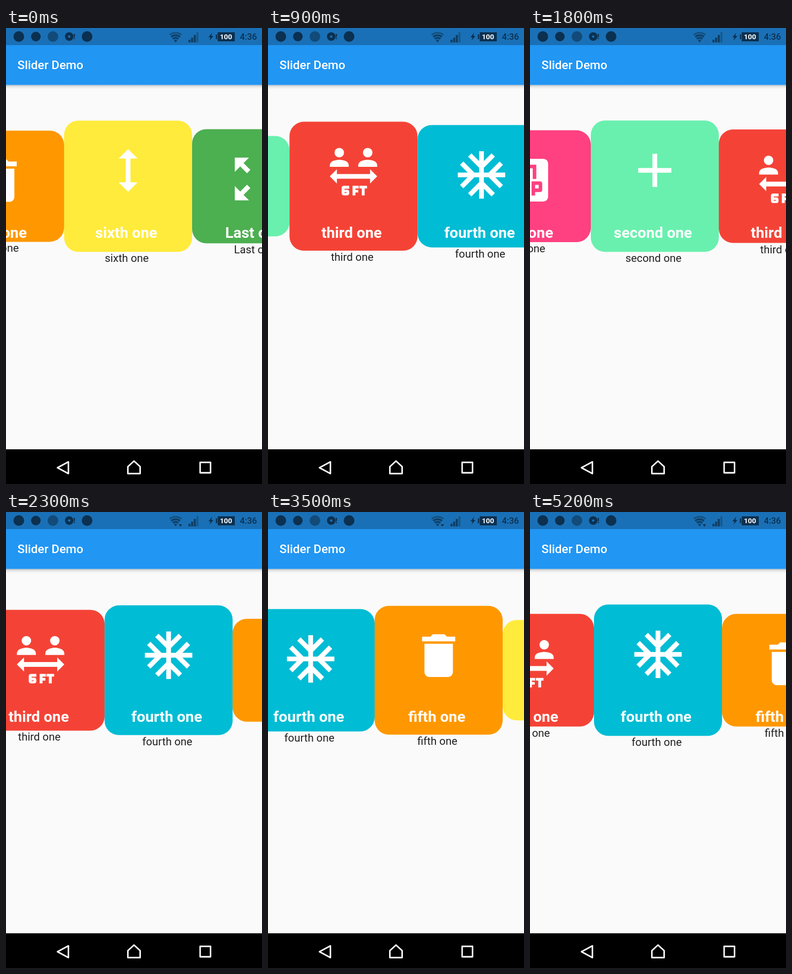
Animation of 480 by 854 pixels, one loop 5.3 s. Source, as an HTML page:

```html
<!DOCTYPE html>
<html lang="en">
<head>
<meta charset="utf-8">
<title>Slider Demo</title>
<style>
  html, body { margin: 0; width: 100%; height: 100%; overflow: hidden; background: #fafafa; }
  svg { display: block; width: 100%; height: 100%; font-family: Roboto, sans-serif; }
  .label { font-size: 28.33px; font-weight: 700; fill: #fff; text-anchor: middle; }
  .caption { font-size: 20.4px; fill: #212121; text-anchor: middle; }
  .title { font-size: 22.67px; font-weight: 500; fill: #fff; }
  .status { fill: #0b3050; }
  .nav { fill: none; stroke: #fff; stroke-width: 2.8; stroke-linejoin: round; }
</style>
</head>
<body>
<svg viewBox="0 0 480 854">
  <defs>
    <linearGradient id="shade" x2="0" y2="1">
      <stop offset="0" stop-color="#000" stop-opacity=".24"/>
      <stop offset=".4" stop-color="#000" stop-opacity=".08"/>
      <stop offset="1" stop-color="#000" stop-opacity="0"/>
    </linearGradient>
    <clipPath id="fan"><path d="M318 27L303 8V4H333V8Z"/></clipPath>
  </defs>
  <rect width="480" height="854" fill="#fafafa"/>
  <g id="cards"></g>

  <rect y="106.67" width="480" height="8" fill="url(#shade)"/>
  <rect width="480" height="106.67" fill="#2196f3"/>
  <rect width="480" height="32" fill="#1a70b6"/>
  <text class="title" x="21.5" y="77">Slider Demo</text>

  <g class="status">
    <circle cx="24" cy="16" r="10"/>
    <circle cx="56" cy="16" r="9"/>
    <circle cx="88" cy="16" r="10" fill="#124b79"/>
    <circle cx="118.500" cy="16" r="8"/>
    <circle cx="118.500" cy="16" r="2.300" fill="#1a70b6"/>
    <path d="M127 11h2.200v6H127zM127 18.500h2.200v2.200H127z"/>
    <circle cx="152" cy="16" r="10"/>
    <g clip-path="url(#fan)" fill="none" stroke="#0f3f67">
      <circle cx="318" cy="27" r="18" stroke-width="3" stroke="#13517f"/>
      <circle cx="318" cy="27" r="13.200" stroke-width="3.500"/>
      <circle cx="318" cy="27" r="8.500" stroke-width="3.500"/>
      <circle cx="318" cy="27" r="2.500" stroke-width="5"/>
    </g>
    <path id="up" d="M306 27.500l3-4.500 3 4.500z"/>
    <path id="down" d="M324 23h6l-3 4.500z"/>
    <path d="M342 22h4v5h-4zM347 18h4v9h-4zM352 13h4v14h-4z" fill="#0f3f67"/>
    <path d="M357 8h4v19h-4z" fill="#155a91"/>
    <path d="M386.500 9l-7 8.500h4l-2 6 7.500-8.500h-4z"/>
    <path d="M397 8h32v17h-32zM393.500 12h2.500v9h-2.500z"/>
    <text x="412.500" y="21" text-anchor="middle" font-size="13.500" font-weight="700" fill="#fff">100</text>
    <text x="438.500" y="22" font-size="16.300" font-weight="500">4:36</text>
  </g>

  <rect y="789" width="480" height="65"/>
  <g class="nav">
    <path d="M96.500 823.500L117 812.500V834.500Z"/>
    <path d="M228.500 821.500L240 811L251.500 821.500V834.500H228.500Z"/>
    <path d="M364 813.500h19.500v19.500H364z"/>
  </g>
</svg>
<script>
const LOOP = 5300, STEP = 100, PITCH = 240;
const person = x => `M${x} 6a2 2 0 1 0 0-4 2 2 0 0 0 0 4z
  M${x + 4} 9.430c0-.81-.48-1.530-1.220-1.850C${x + 1.93} 7.210 ${x + .99} 7 ${x} 7
  s-1.930.21-2.780.58C${x - 3.52} 7.900 ${x - 4} 8.620 ${x - 4} 9.430V10h8z`;

const icons = {
  megapixel: `M5 3h14a2 2 0 0 1 2 2v14a2 2 0 0 1-2 2H5a2 2 0 0 1-2-2V5a2 2 0 0 1 2-2z
    M8.500 5.500h3v6H10V7H8.500zM13 5.500h3v6h-1.500V7H13z
    M12.500 18.500H11V14h-1v3H8.500v-3h-1v4.500H6v-5q0-1 1-1h4.500q1 0 1 1z
    M14 12.500h3.500q1 0 1 1V16q0 1-1 1h-2v1.500H14zM15.500 14v1.500H17V14z`,
  plus: 'M19 13h-6v6h-2v-6H5v-2h6V5h2v6h6v2z',
  distance: `${person(6)}${person(18)}M19 17v-2H5v2l-3-3 3-3v2h14v-2l3 3z
    M10.200 19.200V18H8q-1 0-1 1v2q0 1 1 1h1.200q1 0 1-1v-.4q0-1-1-1h-1v-.4zM8.200 20.700h.9v.3h-.9z
    M11.600 18h2.600v1.100h-1.400v.6h1.200v1.100h-1.200V22h-1.200zM14.500 18h3.200v1.100h-1V22h-1.200v-2.900h-1z`,
  snow: `M22 11h-4.170l3.240-3.240-1.410-1.420L15 11h-2V9l4.660-4.660-1.420-1.410L13 6.170V2h-2v4.170
    L7.760 2.930 6.340 4.340 11 9v2H9L4.340 6.340 2.930 7.760 6.170 11H2v2h4.170l-3.240 3.240 1.410 1.420
    L9 13h2v2l-4.660 4.660 1.420 1.410L11 17.830V22h2v-4.170l3.240 3.240 1.420-1.410L13 15v-2h2
    l4.660 4.660 1.410-1.420L17.830 13H22z`,
  bin: 'M6 19a2 2 0 0 0 2 2h8a2 2 0 0 0 2-2V7H6zM19 4h-3.500l-1-1h-5l-1 1H5v2h14z',
  height: 'M13 7h3l-4-4-4 4h3v10H8l4 4 4-4h-3z',
  expand: [0, 90, 180, 270]
};
const arrow = 'M3 9l2.300-2.300 2.870 2.890 1.420-1.420L6.700 5.300 9 3H3z';

const cards = [
  ['first one', '#ff4081', 'megapixel'],
  ['second one', '#69f0ae', 'plus'],
  ['third one', '#f44336', 'distance'],
  ['fourth one', '#00bcd4', 'snow'],
  ['fifth one', '#ff9800', 'bin'],
  ['sixth one', '#ffeb3b', 'height'],
  ['Last one', '#4caf50', 'expand']
].map(([name, color, icon]) => {
  const add = (parent, tag, attrs, text = '') => {
    const el = document.createElementNS('http://www.w3.org/2000/svg', tag);
    for (const key in attrs) el.setAttribute(key, attrs[key]);
    el.textContent = text;
    return parent.appendChild(el);
  };
  const group = add(document.getElementById('cards'), 'g', {});
  const box = add(group, 'rect', { width: PITCH, rx: 26.67, fill: color });
  const glyph = add(group, 'g', { fill: '#fff', 'fill-rule': 'evenodd' });
  if (icon === 'expand') {
    for (const turn of icons.expand) add(glyph, 'path', { d: arrow, transform: `rotate(${turn} 12 12)` });
  } else {
    add(glyph, 'path', { d: icons[icon] });
  }
  add(group, 'text', { class: 'label', x: 116.5, y: 393 }, name);
  const caption = add(group, 'text', { class: 'caption', x: 117.5 }, name);
  return { group, box, glyph, caption };
});

// Each swipe: start time, end time, first page, last page.
const swipes = [
  [0, 330, 5.046, 4], [330, 650, 4, 3], [650, 1240, 3, 2], [1240, 1905, 2, 1],
  [1905, 2180, 1, 2], [2180, 2430, 2, 3], [2430, 2670, 3, 4], [2670, 2915, 4, 5],
  [3230, 3420, 5, 4], [3420, 3856, 4, 3]
];

function pageAt(time) {
  const [start, end, from, to] = swipes.filter(s => s[0] <= time).pop();
  const rest = 1 - Math.min(1, (time - start) / (end - start));
  return to + (from - to) * rest * rest;
}

// cubic-bezier(0, 0, .58, 1)
function easeOut(x) {
  let low = 0, high = 1;
  for (let i = 0; i < 24; i++) {
    const s = (low + high) / 2;
    if (1.74 * s * s - .74 * s ** 3 < x) low = s; else high = s;
  }
  return 3 * low * low - 2 * low ** 3;
}

function draw(time) {
  const page = pageAt(time);
  cards.forEach(({ group, box, glyph, caption }, i) => {
    const offset = i - page;
    const visible = Math.abs(offset) < 1.6;
    group.style.display = visible ? '' : 'none';
    if (!visible) return;
    const total = 270 * easeOut(1 - .3 * Math.abs(offset));
    const top = 308.33 - total / 2, height = total - 24;
    group.setAttribute('transform', `translate(${120 + offset * PITCH} 0)`);
    box.setAttribute('y', top);
    box.setAttribute('height', height);
    glyph.setAttribute('transform', `translate(66.67 ${top + 40}) scale(4.4444)`);
    caption.setAttribute('y', top + height + 19);
  });
  document.getElementById('down').style.display = time >= 2000 ? '' : 'none';
  document.getElementById('up').style.display = time >= 4000 && time < 5100 ? '' : 'none';
}

const origin = performance.now();
function tick() {
  const time = (performance.now() - origin) % LOOP;
  draw(Math.floor(time / STEP) * STEP);
  requestAnimationFrame(tick);
}
tick();
</script>
</body>
</html>
```
